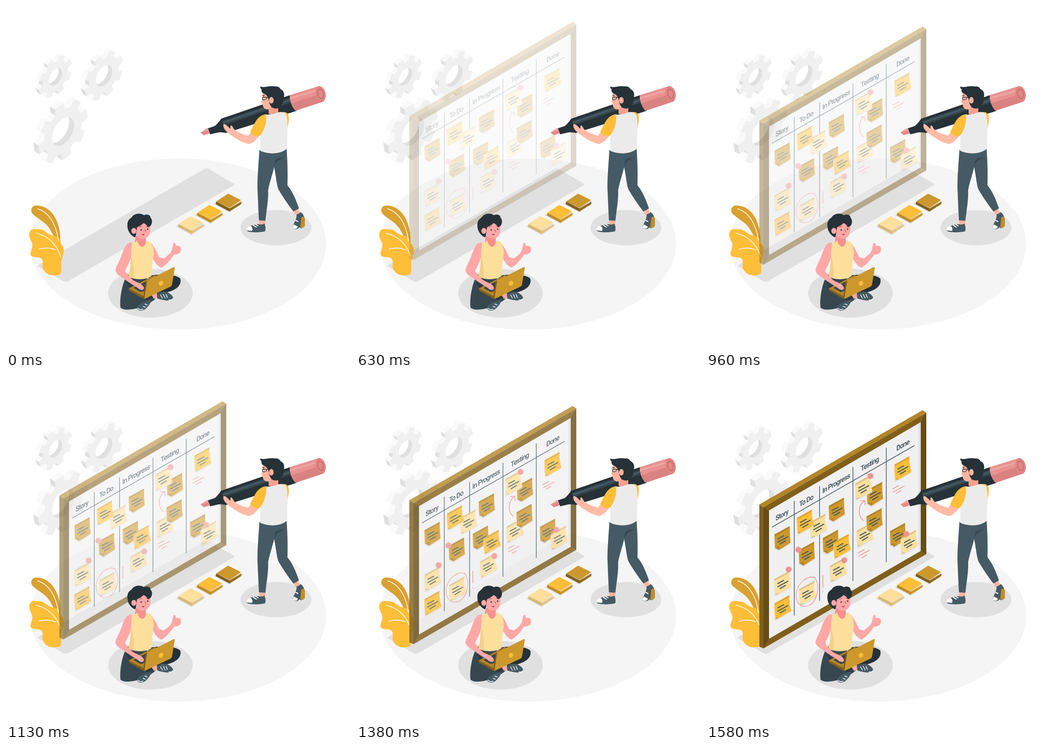
Animation of 748 by 748 pixels, one loop 1620 ms. Source, as an HTML page:

```html
<!DOCTYPE html>
<html lang="en">
<head>
<meta charset="utf-8">
<title>Task board</title>
<style>
  html, body { margin: 0; width: 100%; height: 100%; overflow: hidden; background: #fff; }
  svg { display: block; width: 100vw; height: 100vh; }
  text { font: 500 15.5px Roboto, sans-serif; letter-spacing: -.9px; text-anchor: middle; fill: #37474f; }
  .line { fill: none; stroke-linecap: round; stroke-linejoin: round; }
</style>
</head>
<body>
<svg viewBox="0 0 748 748">
  <ellipse cx="374" cy="517.5" rx="322" ry="186" fill="#f5f5f5"/>
  <path d="M72 562 432 354Q436 352 440 354L495 386Q498 388 495 390L134 599Q130 601 126 599L71 567Q67 565 72 562Z" fill="#e0e0e0"/>
  <ellipse cx="587" cy="482" rx="77" ry="38.500" fill="#e0e0e0"/>
  <ellipse cx="314" cy="624.500" rx="92" ry="53" fill="#e0e0e0"/>
  <g id="gears"></g>

  <g id="plant">
    <path d="M118 520C121 482 107 438 70 434C56 432 52 443 57 451C68 463 88 470 97 488L106 504Z" fill="#d9a130"/>
    <path d="M64 485C55 483 48 491 51 502C54 512 59 514 57 525C55 533 50 540 56 544C63 548 76 544 79 552C82 560 76 568 84 577C93 588 108 587 118 583C123 574 118 562 121 552C123 544 127 536 125 526C122 516 116 517 117 508C114 499 104 500 98 498C88 494 84 487 76 486Z" fill="#ffbe38"/>
    <path class="line" d="M69 441C92 448 109 472 114 510M65 494C92 500 110 518 119 545M72 529C86 524 101 527 107 530" stroke="#fff" stroke-width="1.6"/>
  </g>

  <g id="board">
    <path d="M116 275 125 281V588L116 584Z" fill="#805f1c"/>
    <path d="M116 275 471 70 479 75.500 125 281Z" fill="#b38527"/>
    <path d="M125 281 479 75.500V383L125 588Z" fill="#805f1c"/>
    <path d="M125 281 137 288V567L125 588ZM467 96 479 75.500V383L467 376Z" fill="#664c16"/>
    <path d="M137 288 467 96V376L137 567Z" fill="#f0f0f0"/>
    <path d="M462 99 467 96V376L462 373Z" fill="#e0e0e0"/>
    <path class="line" d="M144 324 453 147M192 268V516M247 236V484M319.500 194V441M392 152V400" stroke="#455a64" stroke-width="1.5"/>
    <g id="labels"></g>
    <g id="notes"></g>
    <g class="line" stroke="#f29595" stroke-width="1.7">
      <path d="M406 241l13-7M407 248l24-13M414 251l10-6M331 380l13-7M332 387l23-12M339 391l10-6"/>
      <path d="M342 310C330 300 330 276 345 267M336 267l9-1 1 10M254 429V455M254 464v1"/>
      <path d="M237 434C219 428 198 447 196 470C195 492 209 502 225 494C243 484 247 454 239 438C234 430 224 432 216 438" stroke-width="1.3"/>
    </g>
  </g>

  <g id="stacks"></g>

  <g id="man">
    <path d="M423 275 438 265 443 277 430 281Z" fill="#e58a8a"/>
    <path d="M423 275 438 265 440 270Z" fill="#f3a5a3"/>
    <path d="M439 266 454 261Q462 254 468 245L620 193 632 228 478 276Q464 273 457 276L444 279Z" fill="#263238"/>
    <path d="M470 250 616 200 619 210 473 259Z" fill="#37474f"/>
    <path d="M471 252 617 203 618 206 472 255Z" fill="#455a64"/>
    <path d="M617 194 680 174.500C694 176 699 200 690 208L629 228Q616 212 617 194Z" fill="#d98282"/>
    <path d="M617 194 680 174.500 678 193 620 212Z" fill="#e89291"/>
    <path d="M617 199 677 181V185L617 203Z" fill="#f0a5a4"/>
    <g fill="#df8584" transform="rotate(-14 684 191)">
      <ellipse cx="684" cy="191" rx="11" ry="17"/>
      <ellipse cx="684" cy="191" rx="7" ry="11.500" fill="#c96c6c"/>
      <ellipse cx="684" cy="191" rx="5" ry="9" fill="#e08a88"/>
    </g>
    <path d="M550 463 564 464 563 479 551 479ZM624 444 635 439 640 453 630 455Z" fill="#ffb49f"/>
    <path d="M524 488C522 481 530 477 548 474Q556 477 562 473C565 480 565 488 563 490C550 493 530 493 524 489Z" fill="#455a64"/>
    <path d="M524 488C522 483 525 480 532 478Q538 483 535 489ZM536 477l8 5 2-1-7-5ZM541 475l7 4 2-1-6-4Z" fill="#fff"/>
    <path d="M632 453Q638 452 640 448C648 452 651 463 649 475C647 483 641 485 638 481C634 487 625 486 623 481C626 471 632 465 632 453Z" fill="#455a64"/>
    <path d="M642 460Q648 455 650 463V478Q645 485 640 481Z" fill="#c18d26"/>
    <path d="M626 475l9 5-3 4q-7 1-9-3ZM630 465l6 3-1 2-6-3Z" fill="#fff"/>
    <path d="M551 313C549 345 546 380 547 400C548 425 549 450 550 466L564 467C567 440 571 420 570 400C574 380 580 365 583 350C587 370 588 385 592 398C600 412 612 430 625 447L637 440C630 420 623 403 612 390C613 365 612 335 610 308C595 324 570 322 551 313Z" fill="#455a64"/>
    <path d="M583 350C586 338 594 334 605 330C598 329 587 331 585 337Z" fill="#37474f"/>
    <path d="M571 221H592V234Q580 240 571 234Z" fill="#f5a08d"/>
    <path d="M558 190C558 199 557 204 555 209L558 212C558 222 564 227 574 224L586 210 580 184 560 184Z" fill="#ffb49f"/>
    <path d="M553 175C562 179 572 172 585 175C591 174 596 178 597 181C605 184 606 192 604 201C604 211 598 221 588 223Q577 224 573 212L571 203C569 196 566 193 560 190C555 188 555 183 556 181Q552 179 553 175Z" fill="#263238"/>
    <ellipse cx="577" cy="205" rx="5" ry="7" fill="#ffb49f"/>
    <path class="line" d="M572 199 559 198Q556 201 559 204Q566 205 567 199M558 195l4-1" stroke="#263238" stroke-width="1.3"/>
    <path d="M600 231C614 228 617 240 614 255L609 280Z" fill="#ffbe38"/>
    <path d="M565 236Q580 237 592 231Q602 229 608 234C615 248 611 270 611 310C597 323 570 323 553 315V270Z" fill="#ebebeb"/>
    <path d="M533 274 526 282C510 278 500 272 496 268C493 264 491 257 488 261V267C483 262 476 255 473 257C471 264 476 270 482 275C495 286 512 297 528 300C538 299 546 288 551 282Z" fill="#ffbba6"/>
    <path d="M567 235C553 236 545 246 540 256L531 274C537 282 546 285 552 282C561 272 568 252 565 236Z" fill="#ffbe38"/>
  </g>

  <g id="woman">
    <path d="M316 586C340 582 372 584 379 593C383 608 368 618 352 622L315 637 290 610Z" fill="#263238"/>
    <path d="M264 584C254 598 246 635 249 656C258 663 275 660 290 656C307 650 320 642 330 632L305 590Z" fill="#37474f"/>
    <path d="M258 592C274 612 288 620 325 630L310 641C290 630 270 624 258 592Z" fill="#2c3a41"/>
    <path d="M316 628 328 624 331 634 322 637Z" fill="#ffa8a7"/>
    <path d="M285 657C288 664 296 664 304 658C311 652 317 643 315 638L299 644Q286 649 285 657ZM328 627C334 621 346 620 352 623C359 627 365 632 363 637C354 643 343 640 329 636Z" fill="#455a64"/>
    <path class="line" d="M287 657q4 5 11 2M298 653l5 2M302 648l5 2M354 639q7 1 9-3M336 628l4 7M342 627l4 8M348 627l3 7" stroke="#fff" stroke-width="1.5"/>
    <path d="M309 511C318 514 325 529 333 546L343 549C351 543 358 538 360 532C363 527 362 514 367 515C370 518 368 521 371 522C378 520 382 525 380 533C378 540 370 540 365 541C358 552 348 564 338 569C328 565 322 555 317 544Z" fill="#ffa8a7"/>
    <path d="M282 500H304V516Q305 526 294 530L280 516Z" fill="#f78f8f"/>
    <path d="M273 515C281 515 283 513 285 509C289 526 302 530 305 510L312 512C320 518 322 531 321 542C317 560 318 574 316 588C300 597 280 595 266 589C271 570 273 550 270 540Z" fill="#ffdf9c"/>
    <path d="M271 540Q279 560 278 592L266 589Q272 568 271 540Z" fill="#f5d086"/>
    <path d="M281 466C279 489 282 507 298 506C310 505 315 495 314 480L310 463Z" fill="#ffa8a7"/>
    <path d="M280 503C270 498 264 488 264 478C263 466 270 462 273 460C278 451 292 449 300 455C308 451 315 456 314 460C321 466 317 481 308 481C306 475 302 473 299 472C294 477 288 480 285 481L283 494Q283 501 280 503Z" fill="#263238"/>
    <ellipse cx="278" cy="489" rx="5.500" ry="6.500" fill="#ffa8a7"/>
    <g fill="#263238"><circle cx="294" cy="487" r="1.600"/><circle cx="308" cy="485" r="1.600"/></g>
    <path d="M294 495Q298 497 301 495Q301 499 298 499Z" fill="#b34b50"/>
    <path class="line" d="M290 481l5-2M305 479l5-1M302 486l2 5" stroke="#5c3437" stroke-width=".8"/>
    <path d="M267 614 324 585 330 590 301 636 270 620Z" fill="#b38527"/>
    <path d="M267 614V618L299 637 301 632Z" fill="#805f1c"/>
    <path d="M277 613 312 595 306 618 293 622Z" fill="#37474f"/>
    <path d="M274 514C262 513 257 526 252 540C247 555 240 565 238 574C238 581 246 587 255 592C265 600 276 606 285 612C290 617 299 621 300 613C298 604 287 602 278 597C269 590 263 583 259 576C266 562 273 550 272 538Z" fill="#ffa8a7"/>
    <path d="M304 598 307 597 301 637 298 635Z" fill="#805f1c"/>
    <path d="M307 597 364 568Q368 567 367 570L361 605Q361 608 358 610L301 637Z" fill="#cc982d"/>
    <ellipse cx="337" cy="603" rx="4.500" ry="5.500" fill="#ffbe38" transform="rotate(25 337 603)"/>
  </g>
</svg>
<script>
const LOOP = 1620, DURATION = 1580, DROP = 44.9;
const BROWN = '#cc982d', GOLD = '#ffbe38', CREAM = '#ffdf9c';
const get = id => document.getElementById(id);
const path = (d, fill, extra = '') => `<path d="${d}" fill="${fill}" ${extra}/>`;
const polygon = points => 'M' + points.map(p => p.map(n => n.toFixed(1))).join('L') + 'Z';

// Upright isometric gear, extruded towards the upper left.
function gear(cx, cy, radius, hole, depth, phase) {
  const dx = -depth, dy = -depth * .57;
  const project = (r, deg) => {
    const a = deg * Math.PI / 180, u = r * Math.cos(a);
    return [cx + .866 * u, cy + r * Math.sin(a) - .5 * u];
  };
  const rim = [];
  for (let i = 0; i < 8; i++)
    for (const [r, offset] of [[.77, -14], [1, -10], [1, 10], [.77, 14]])
      rim.push(project(radius * r, phase + i * 45 + offset));
  let out = '';
  rim.forEach((p, i) => {
    const q = rim[(i + 1) % rim.length];
    const ex = q[0] - p[0], ey = q[1] - p[1];
    if (ey * dx - ex * dy <= 0) return;
    const side = [p, q, [q[0] + dx, q[1] + dy], [p[0] + dx, p[1] + dy]];
    out += path(polygon(side), ex > 2 ? '#fafafa' : '#e0e0e0');
  });
  const ring = polygon(Array.from({ length: 60 }, (_, i) => project(hole, i * 6)));
  const clip = `hole${cx}`;
  return out + path(polygon(rim), '#f0f0f0') + path(ring, '#e0e0e0') +
    `<clipPath id="${clip}"><path d="${ring}"/></clipPath><g clip-path="url(#${clip})">` +
    path(ring, '#fff', `transform="translate(${dx} ${dy})"`) + '</g>';
}

// Brown notes curl at the lower left, the others flare at the lower right.
function note(x, y, color) {
  const curled = color === BROWN;
  const sheet = curled ? 'M0 0 33-18Q33 2 35 18L10 34 1 29Z' : 'M0 0 32-18Q32 2 37 16L11 31 2 35Q0 20 0 0Z';
  const fold = curled ? 'M1 29 11 26 10 34Z' : 'M2 35 3 31 11 31Z';
  return `<g transform="translate(${x} ${y})">` +
    path(sheet, '#e0e0e0', 'transform="translate(-1 3)"') + path(sheet, color) +
    path('M0 0 33-18V-14L0 4Z' + fold, '#000', 'opacity=".13"') +
    '<path class="line" d="M7 10l13-7M7 17l22-12M12 21l12-7" stroke="#455a64" stroke-width="2.1"/></g>';
}

const pin = (x, y) => `<circle cx="${x}" cy="${y}" r="6.500" fill="#f5a3a2"/>` +
  `<circle cx="${x - 1}" cy="${y + 1}" r="5.500" fill="#ee9292"/>`;

function stack(i, top, left, right) {
  return `<g transform="translate(${i * 41} ${i * -24.5})">` +
    path('M369 479 402 460 434 477 403 498Z', '#e0e0e0') +
    path('M375 474 404 489V496L374 480Z', left) +
    path('M404 489 430 474 429 480 404 496Z', right) +
    path('M375 474 401 457 429 471 404 488Z', top) +
    path('M375 477 404 492 430 477', 'none', `stroke="${left}" stroke-width=".8"`) + '</g>';
}

get('gears').innerHTML = gear(107.5, 154, 42, 17, 8, -20) +
  gear(213, 152, 48.5, 21, 9, -19) + gear(124, 273, 62, 28, 11, -9);

get('labels').innerHTML = [['Story', 165, 298], ['To Do', 218, 267], ['In Progress', 283, 229],
  ['Testing', 356, 187], ['Done', 428, 146]].map(([label, x, y]) =>
  `<text transform="matrix(.866 -.5 0 1 ${x} ${y + 5})">${label}</text>`).join('');

get('notes').innerHTML = [
  [149, 340, BROWN], [227, 313, CREAM], [198, 304, GOLD], [267, 278, BROWN],
  [350, 244, BROWN], [325, 229, CREAM], [410, 188, GOLD], [328, 332, CREAM],
  [349, 301, BROWN], [202, 374, BROWN], [254, 348, BROWN], [278, 357, GOLD],
  [270, 408, CREAM], [203, 459, CREAM], [149, 437, CREAM], [149, 490, GOLD],
  [400, 333, BROWN], [424, 348, CREAM]
].map(n => note(...n)).join('') +
  [[358, 213], [201, 373], [301, 396], [180, 416], [436, 339]].map(p => pin(...p)).join('');

get('stacks').innerHTML = stack(0, CREAM, '#d9b873', '#e6c98c') +
  stack(1, GOLD, '#c08c26', '#d29b2d') + stack(2, BROWN, '#805f1c', '#997222');

const board = get('board');
const start = performance.now();
function draw() {
  const time = (performance.now() - start) % LOOP;
  const shown = Math.min(1, time / DURATION) ** 1.7;
  board.setAttribute('opacity', shown);
  board.setAttribute('transform', `translate(0 ${-DROP * (1 - shown)})`);
  requestAnimationFrame(draw);
}
draw();
</script>
</body>
</html>
```
